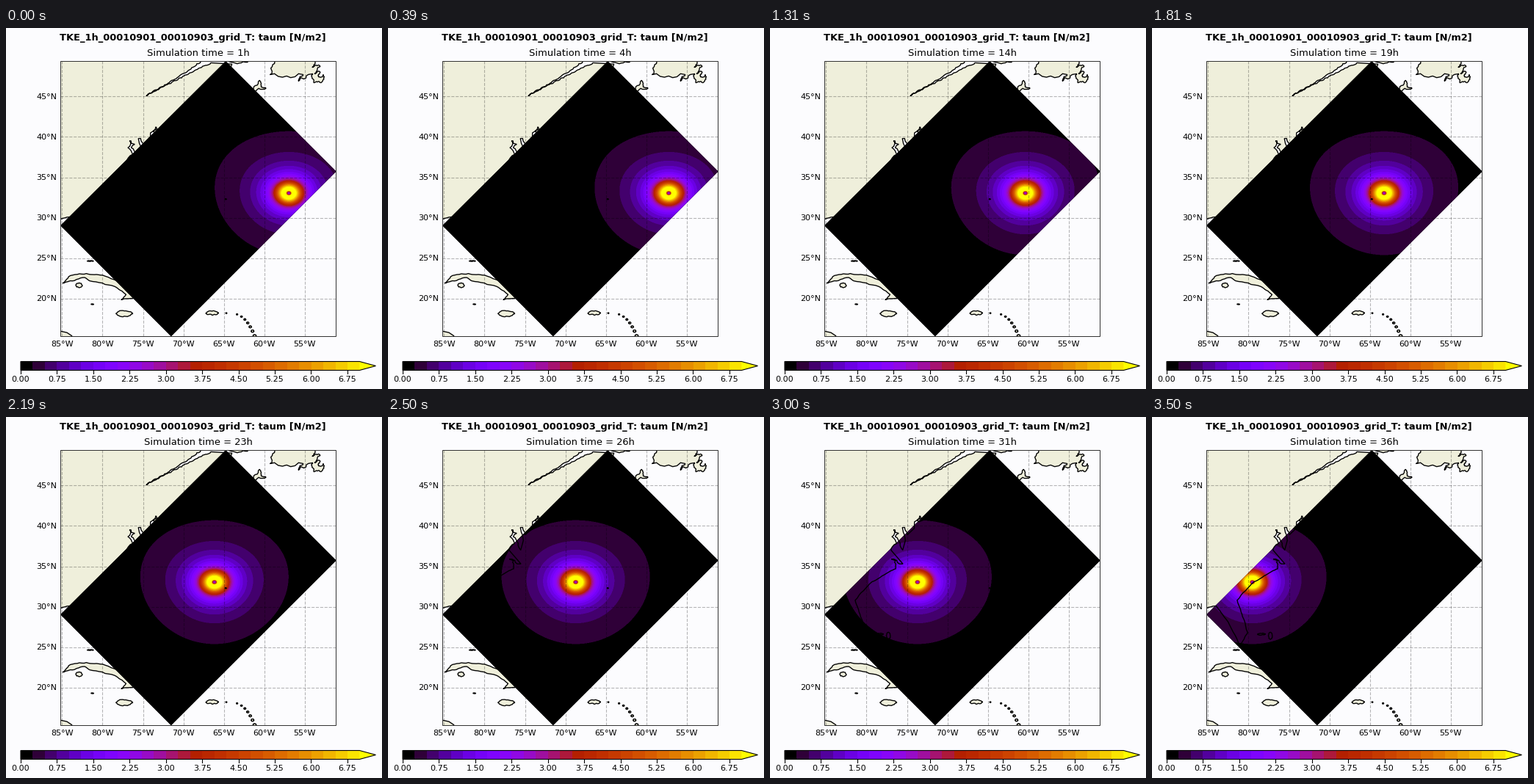
These frames come from a looping animation (512 by 492 pixels, 3.61 s). A matplotlib script:

```python
import numpy as np
import matplotlib.pyplot as plt
from matplotlib.animation import FuncAnimation
from matplotlib.patches import Polygon, Rectangle

W, H, DPI = 512, 492, 100
PT = 72 / DPI
LOOP, STEP, HOURS = 3610, 19, 36
PAPER, LAND = "#fcfcfe", (0.9375, 0.9375, 0.859)
DEG = 11.02                              # pixels per degree
X80, Y20 = 131.4, 368.8                  # pixel of 80°W and of 20°N
LEFT, TOP, SIDE = 74, 45, 375            # map box
EYE_LAT = 33.0
BAND, BANDS = 0.25, 28
COLORS = plt.get_cmap("gnuplot")(np.linspace(0, 1, BANDS + 1))[:, :3]


def px(lon):
    return X80 + DEG * (np.asarray(lon) + 80)


def py(lat):
    return Y20 - DEG * (np.asarray(lat) - 20)


# ---- coast outlines in lon, lat
def rough(points, seed, amp=0.16, rounds=3):
    """Roughen a line by random midpoint displacement."""
    rng = np.random.default_rng(seed)
    p = np.array(points, float)
    for _ in range(rounds):
        d = np.diff(p, axis=0)
        size = np.hypot(*d.T)
        push = rng.uniform(-1, 1, len(d)) * np.minimum(amp * size, amp)
        mid = p[:-1] + d / 2 + np.c_[-d[:, 1], d[:, 0]] * (push / size)[:, None]
        out = np.empty((2 * len(p) - 1, 2))
        out[::2], out[1::2] = p, mid
        p = out
    return p


def island(lon, lat, w, h, seed):
    a = np.linspace(0, 2 * np.pi, 9)
    ring = np.c_[lon + w / 2 * np.cos(a), lat + h / 2 * np.sin(a)]
    return rough(ring, seed, rounds=2)


def inlet(mouth, head, width, seed, n=7):
    """Ragged bay: up one shore to the head and down the other."""
    rng = np.random.default_rng(seed)
    s = np.r_[np.linspace(0, 1, n), np.linspace(1, 0, n)]
    side = np.repeat([-1, 1], n) * width * (1.1 - s)
    axis = np.array(mouth) + s[:, None] * np.subtract(head, mouth)
    return axis + np.c_[side + width * rng.uniform(-1, 1, 2 * n), 0 * s]


def estuary():
    """South shore of a widening river, then back along the north shore."""
    s = np.linspace(0, 0.8, 13)
    lon, lat, half = -74.6 + 10 * s, 45.05 + 5.7 * s, 0.7 * s ** 2
    south, north = np.c_[lon, lat - half], np.c_[lon, lat + half]
    return rough(np.vstack([south[::-1], north]), 9, rounds=2)


southeast = rough([(-85.6, 29.7), (-84, 30.1), (-82.8, 28.5), (-81.1, 25.2), (-80.1, 26.8),
                   (-80.6, 28.5), (-81.4, 30.8), (-79.3, 33.1), (-77.9, 33.9), (-76.4, 34.7)],
                  4, 0.06)
mainland = np.vstack([
    southeast,
    inlet((-76, 35.3), (-76.7, 35.9), 0.25, 2, 4), [(-75.5, 35.3)],
    rough(inlet((-76.1, 37), (-76.4, 39.5), 0.45, 3), 5, rounds=1),
    [(-75.2, 38.2)], inlet((-75.1, 38.9), (-75.5, 39.8), 0.2, 6, 4),
    [(-74.1, 39.7)], inlet((-73.9, 40.5), (-73.3, 41.2), 0.2, 7, 4),
    [(-66, 43.5), (-64, 49)], estuary(), [(-66, 51), (-87, 51), (-87, 29.7)],
])
cuba = rough([(-84.9, 21.9), (-84.2, 22.7), (-82, 23.1), (-80, 22.9), (-77.2, 21.7),
              (-74.2, 20.2), (-77.7, 19.85), (-77.1, 20.5), (-78.5, 21.5), (-81.6, 22.2),
              (-82.2, 22.6), (-83.6, 22.2), (-84.9, 21.9)], 8, 0.1)
newfoundland = rough([(-58, 50), (-59.2, 48.5), (-59.3, 47.7), (-55.2, 47.7), (-55.8, 46.9),
                      (-54, 47.8), (-53.9, 46.7), (-53, 46.7), (-52.7, 47.7), (-53.3, 47.4),
                      (-53.1, 48), (-53.8, 47.8), (-53.1, 48.7), (-54.1, 48.6), (-53.6, 50)],
                     12, 0.28)
honduras = [(-87, 16), (-85.1, 15.95), (-84.4, 15.8), (-83.8, 15.4), (-83.2, 14), (-87, 14)]
cape_breton = rough([(-61.5, 45.6), (-60.6, 47), (-60.4, 46.2), (-59.8, 46), (-61.5, 45.6)],
                    15, 0.22)
ISLANDS = [                              # centre, width, height
    (-77.3, 18.15, 2.1, 0.65), (-82.9, 21.65, 0.8, 0.6), (-66.45, 18.2, 1.6, 0.5),
    (-81.25, 19.3, 0.35, 0.08), (-81.5, 24.65, 0.8, 0.1), (-78.4, 26.6, 1.0, 0.2),
    (-77.3, 26.4, 0.5, 0.9), (-64.78, 32.3, 0.2, 0.08), (-63.1, 49.5, 2.8, 0.75),
]
shapes = [mainland, cuba, newfoundland, cape_breton, np.array(honduras)]
shapes += [island(*spec, 20 + i) for i, spec in enumerate(ISLANDS)]
for k, s in enumerate(np.linspace(0, 1, 8)):           # island arc
    size = 0.15 + 0.25 * s
    shapes.append(island(-64.7 + 3.5 * np.sqrt(s), 18.2 - 2.8 * s ** 1.5,
                         size, 0.8 * size, 40 + k))


# ---- wind stress field, sampled twice per pixel
sub = (np.arange(2 * SIDE) + 0.5) / 2
LON = (LEFT + 0.5 + sub - X80)[None, :] / DEG - 80
LAT = 20 - (TOP + 0.5 + sub - Y20)[:, None] / DEG


def stress(hour):
    """Flat-topped vortex with a calm eye that speeds up westward."""
    eye = -57.0 - 0.01742 * hour ** 2
    r = np.hypot((LON - eye) * np.cos(np.radians(LAT)), LAT - EYE_LAT)
    r *= DEG / np.cos(np.radians(EYE_LAT))
    core = 1 - 0.68 * np.exp(-(r / 3.4) ** 4)
    return 8 * core / (1 + (r / 13.1) ** 4) ** 0.425


def shade(hour):
    band = np.minimum(stress(hour) / BAND, BANDS).astype(int)
    rgb = (COLORS * 255)[band]
    return rgb.reshape(SIDE, 2, SIDE, 2, 3).mean(axis=(1, 3)).astype(np.uint8)


fields = [shade(h) for h in range(1, HOURS + 1)]

# ---- stage in pixel coordinates
fig = plt.figure(figsize=(W / DPI, H / DPI), dpi=DPI, facecolor=PAPER)
ax = fig.add_axes([0, 0, 1, 1])
ax.axis("off")


def label(x, y, s, size=11.1, ha="center", **kw):
    return ax.text(x, y, s, fontsize=size * PT, ha=ha, va="baseline",
                   family="DejaVu Sans", **kw)


box = Rectangle((LEFT, TOP), SIDE, SIDE, fill=False, ec="0.2", lw=PT, zorder=5)
ax.add_patch(box)

for s in shapes:
    xy = np.c_[px(s[:, 0]), py(s[:, 1])]
    for style in (dict(fc=LAND, ec="none", zorder=1),
                  dict(fill=False, ec="black", lw=1.35 * PT, zorder=4)):
        patch = ax.add_patch(Polygon(xy, **style))
        patch.set_clip_path(box)

domain = Polygon([(299.2, 45.2), (449.6, 195.5), (224.8, 420.2), (74.2, 269.2)],
                 fc="black", ec="none", zorder=2)
ax.add_patch(domain)
x0, y0 = LEFT + 0.5, TOP + 0.5
field = ax.imshow(fields[0], extent=(x0, x0 + SIDE, y0 + SIDE, y0),
                  interpolation="nearest", aspect="auto", zorder=2.5)
field.set_clip_path(domain)

grid = dict(color="black", alpha=0.28, lw=0.8, ls="--", zorder=3)
for lon in range(-85, -50, 5):
    x = px(lon)
    ax.plot([x, x], [TOP + SIDE, TOP], **grid)
    label(x, 434.4, f"{-lon}°W")
for lat in range(20, 50, 5):
    y = py(lat)
    ax.plot([LEFT, LEFT + SIDE], [y, y], **grid)
    label(69, y + 3.6, f"{lat}°N", ha="right")

# ---- colour bar
X0, X1, Y0, Y1 = 20, 481.4, 454.5, 466.5
tip = (503.5, (Y0 + Y1) / 2)
ax.imshow(COLORS[None, :BANDS], extent=(X0, X1, Y1, Y0), interpolation="nearest",
          aspect="auto", zorder=2)
ax.add_patch(Polygon([(X1, Y0), tip, (X1, Y1)], fc=COLORS[-1], ec="none", zorder=2))
ax.add_patch(Polygon([(X0, Y0), (X1, Y0), tip, (X1, Y1), (X0, Y1)], fill=False,
                     ec="black", lw=1.1 * PT, zorder=3))
for v in np.arange(0, 7, 0.75):
    x = X0 + (X1 - X0) * v / 7
    ax.plot([x, x], [Y1, Y1 + 4], color="black", lw=1.1 * PT)
    label(x, 482.3, f"{v:.2f}")

label(254.3, 17.4, "TKE_1h_00010901_00010903_grid_T: taum [N/m2]", 13, weight="bold")
clock = label(262.3, 38.4, "", 13)

ax.set_xlim(0, W)
ax.set_ylim(H, 0)


def update(i):
    hour = min(HOURS, 1 + (i * STEP + STEP - 2) // 100)
    field.set_data(fields[hour - 1])
    clock.set_text(f"Simulation time = {hour}h")
    return field, clock


anim = FuncAnimation(fig, update, frames=LOOP // STEP, interval=STEP,
                     repeat=True, repeat_delay=0)
plt.show()
```
